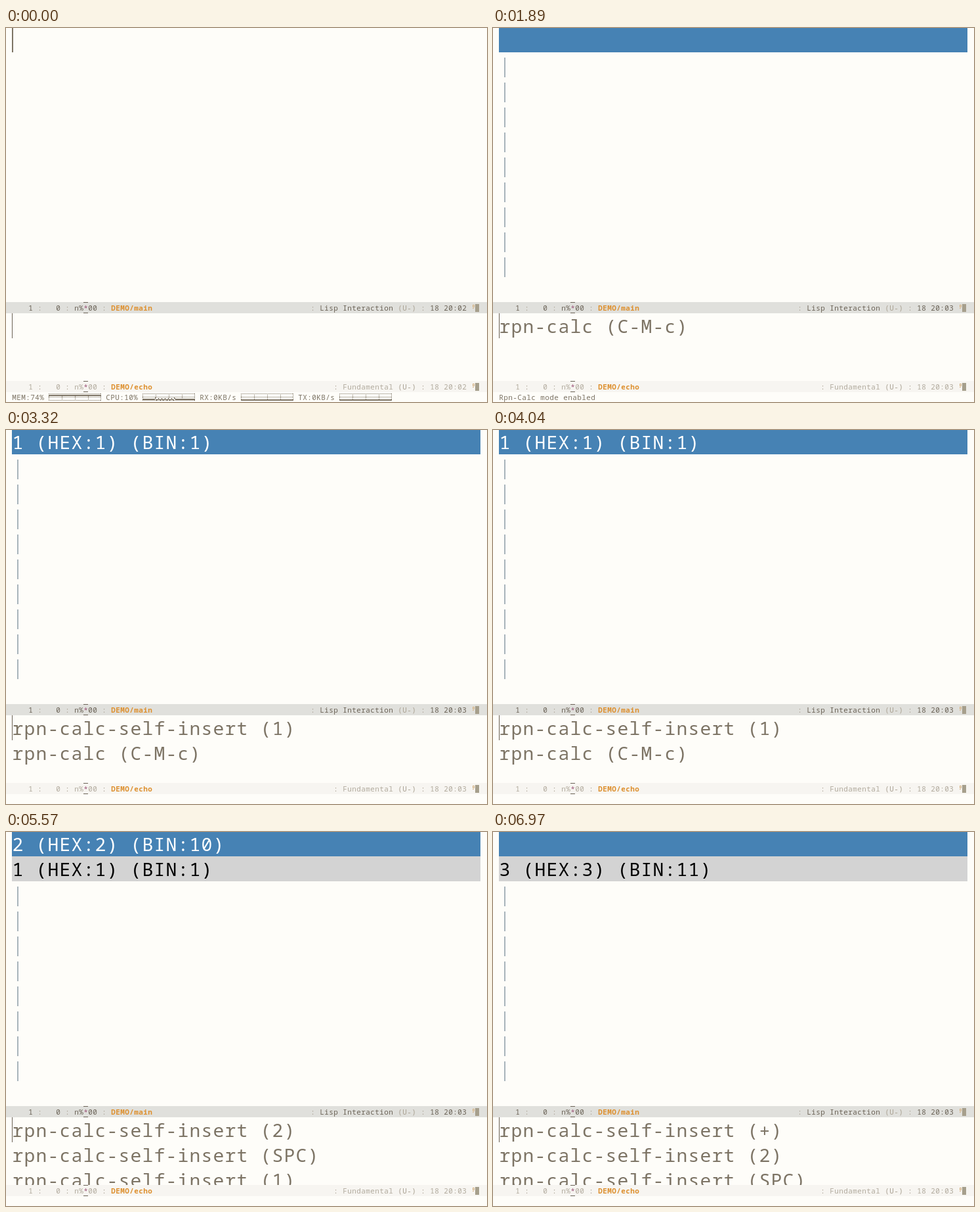
Recreate the animation shown at these times as an HTML page with a canvas. Size 733x569 px, loop 8000 ms.

```html
<!DOCTYPE html>
<html lang="en">
<head>
<meta charset="utf-8">
<title>RPN calculator in an editor</title>
<style>
  html, body { margin: 0; width: 100%; height: 100%; overflow: hidden; background: #fefdf9; }
  canvas { display: block; }
</style>
</head>
<body>
<canvas id="stage" width="733" height="569"></canvas>
<script>
const ctx = document.getElementById('stage').getContext('2d');
const LOOP = 8000;
const ROW = 38;
const MONO = '"Noto Sans Mono", "DejaVu Sans Mono", monospace';
const BIG = { font: `28px ${MONO}`, cell: 18 };
const SMALL = { font: `11px ${MONO}`, cell: 7 };
const BOLD = { font: `bold 11px ${MONO}`, cell: 7 };

const PAPER = '#fefdf9', INK = '#7d7465', DARK = '#6a6256', PALE = '#aaa293', FAINT = '#b2ab9e';
const ORANGE = '#dd8f2d', PURPLE = '#9c5478', BLUE = '#4682b4', GREY = '#d3d3d3', PIPE = '#a8b4bb';

// Each step: start time, typed value, stack, key log (newest first).
const insert = key => `rpn-calc-self-insert (${key})`;
const START = 'rpn-calc (C-M-c)';
const steps = [
  { at: 0, log: [] },
  { at: 1890, input: null, stack: [], log: [START], message: 'Rpn-Calc mode enabled' },
  { at: 3320, input: 1, stack: [], log: [insert('1'), START] },
  { at: 4520, input: null, stack: [1], log: [insert('SPC'), insert('1'), START] },
  { at: 5570, input: 2, stack: [1], log: [insert('2'), insert('SPC'), insert('1')] },
  { at: 6970, input: null, stack: [3], log: [insert('+'), insert('2'), insert('SPC')] }
];

function rect(x, y, w, h, color) {
  ctx.fillStyle = color;
  ctx.fillRect(x, y, w, h);
}

// Text on a fixed character grid.
function text(str, x, y, color, style = SMALL) {
  ctx.font = style.font;
  ctx.fillStyle = color;
  ctx.textAlign = 'center';
  [...str].forEach((ch, i) => ctx.fillText(ch, x + (i + 0.5) * style.cell, y));
}

function dots(x, y, w, h) {
  for (let i = 0; i < Math.max(w, h); i += 2) {
    rect(x + (w > h ? i : 0), y + (h > w ? i : 0), 1, 1, INK);
  }
}

function graph(x, level) {
  dots(x, 556, 80, 1);
  dots(x, 561, 80, 1);
  dots(x, 566, 80, 1);
  for (let i = 0; i < 4; i++) dots(x + i * 20, 556, 1, 11);
  dots(x + 79, 556, 1, 11);
  for (let i = 0; i < 80; i++) rect(x + i, level(i), 1, 2, INK);
}

function monitor() {
  const base = () => 565;
  const cpu = i => i < 18 || i > 50 ? 564
    : i === 19 || i === 48 ? 562
    : 564 + Math.round(Math.sin(i * 1.25));
  text('MEM:74%', 9, 566, INK);
  graph(65, () => 558);
  text('CPU:10%', 152, 566, INK);
  graph(208, cpu);
  text('RX:0KB/s', 295, 566, INK);
  graph(358, base);
  text('TX:0KB/s', 445, 566, INK);
  graph(508, base);
}

function modeLine(top, active, name, mode, clock) {
  const y = top + 13;
  const main = active ? DARK : FAINT;
  rect(0, top, 733, 17, active ? '#e0e0dc' : '#f7f5f1');
  text('1', 34, y, main);
  text('0', 76, y, main);
  text('n%', 104, y, main);
  text('*', 118, y, PURPLE);
  text('00', 125, y, main);
  rect(118, top, 7, 1, DARK);
  rect(118, top + 16, 7, 1, DARK);
  text(name, 160, y, ORANGE, BOLD);

  const modeX = 590 - mode.length * 7;
  for (const x of [48, 90, 146, modeX - 14, 632]) text(':', x, y, PALE);
  text(mode, modeX, y, main);
  text('(U-)', 597, y, PALE);
  text(clock, 646, y, main);

  ctx.strokeStyle = '#d5b488';
  ctx.lineWidth = 1;
  ctx.strokeRect(711.5, top + 4.5, 2, 3);
  rect(711, top + 9, 2, 1, '#d5b488');
  rect(715, top + 3, 6, 12, '#a69f8c');
}

function describe(n) {
  return `${n} (HEX:${n.toString(16).toUpperCase()}) (BIN:${n.toString(2)})`;
}

function calculator({ input, stack }) {
  rect(9, 0, 714, 37, BLUE);
  if (input !== null) text(describe(input), 9, 29, '#fff', BIG);
  for (let i = 1; i < 10; i++) {
    const top = i * ROW - 1;
    if (i <= stack.length) {
      rect(9, top, 714, ROW, GREY);
      text(describe(stack[i - 1]), 9, top + 30, '#000', BIG);
    } else {
      rect(17, top + 8, 2, 30, PIPE);
    }
  }
}

function draw(t) {
  const step = steps.filter(s => s.at <= t).pop();
  const clock = t < 770 ? '18 20:02' : '18 20:03';
  rect(0, 0, 733, 569, PAPER);

  if (step.stack) calculator(step);
  else rect(9, 0, 2, 37, INK);

  step.log.forEach((line, i) => text(line, 9, 464 + i * ROW, INK, BIG));
  rect(9, 434, 1, 38, DARK);

  modeLine(417, true, 'DEMO/main', 'Lisp Interaction', clock);
  modeLine(537, false, 'DEMO/echo', 'Fundamental', clock);

  rect(0, 554, 733, 15, PAPER);
  if (!step.stack) monitor();
  else if (step.message) text(step.message, 9, 566, INK);
}

const begin = performance.now();
function tick() {
  draw((performance.now() - begin) % LOOP);
  requestAnimationFrame(tick);
}
tick();
</script>
</body>
</html>
```
